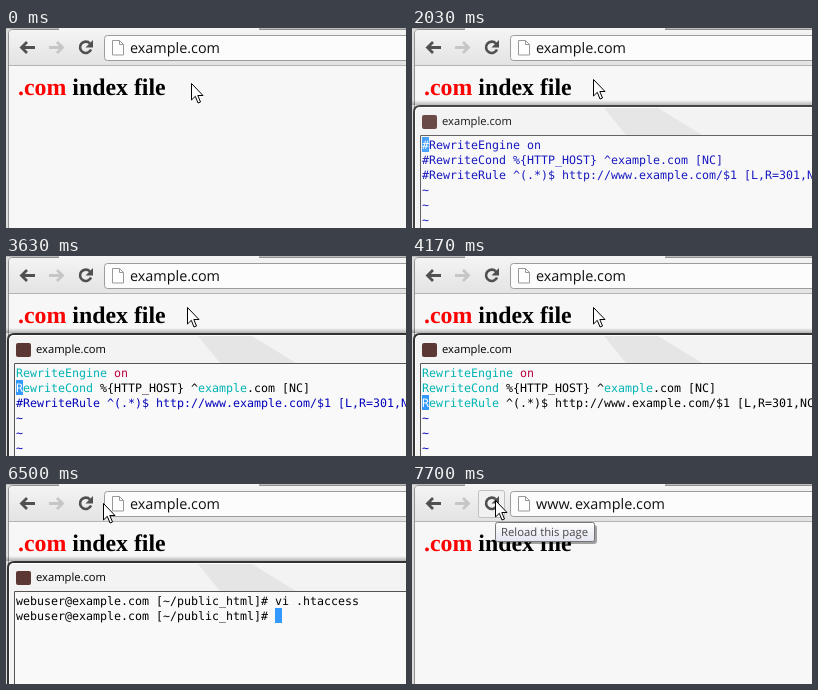
Write an HTML page that moves like this. It is 400 px wide and 200 px high and loops after 8030 ms.

```html
<!DOCTYPE html>
<html lang="en">
<head>
<meta charset="utf-8">
<title>Redirect demo</title>
<style>
html, body { margin: 0; width: 100%; height: 100%; overflow: hidden; }
svg { display: block; width: 400px; height: 200px; }
text { font-family: "Open Sans", "Noto Sans", sans-serif; white-space: pre; text-rendering: geometricPrecision; }
.heading { font: bold 23.85px "Liberation Serif", "Noto Serif", serif; }
.mono, .mono text { font: 11.63px "DejaVu Sans Mono", "Liberation Mono", monospace; }
</style>
</head>
<body>
<svg viewBox="0 0 400 200">
  <defs>
    <linearGradient id="bar" x2="0" y2="1"><stop stop-color="#f4f4f4"/><stop offset="1" stop-color="#e3e3e3"/></linearGradient>
    <linearGradient id="tip" x2="0" y2="1"><stop stop-color="#fff"/><stop offset="1" stop-color="#e4e5f0"/></linearGradient>
    <linearGradient id="shade" x2="0" y2="1"><stop stop-opacity="0"/><stop offset="1" stop-opacity=".28"/></linearGradient>
  </defs>

  <!-- Browser -->
  <rect width="400" height="200" fill="#dcdcdc"/>
  <rect width="400" height="1" fill="#bcbcbc"/>
  <path d="M2.500 201V6q0-4.500 4.500-4.500H401V201Z" fill="#f7f7f7" stroke="#929292"/>
  <path d="M3 37V6q0-4 4-4H400V37Z" fill="url(#bar)"/>
  <path d="M53 0H253V3H53Z" fill="#f4f4f4"/>
  <path d="M3 37.500H400" stroke="#b4b4b4"/>
  <g fill="none" stroke-width="2.800">
    <path d="M29 19.500H16M21 14l-5.500 5.500 5.500 5.500" stroke="#505050"/>
    <path d="M43 19.500H56M51 14l5.500 5.500-5.500 5.500" stroke="#c6c6c6"/>
  </g>
  <rect id="button" x="66.500" y="6.500" width="26" height="27" rx="2" stroke="#c0c0c0"/>
  <path d="M84 15.500A5.700 5.700 0 1 0 85 21.500" fill="none" stroke="#505050" stroke-width="2.600"/>
  <path d="M87 12v7.500h-7.500Z" fill="#505050"/>
  <rect x="98.500" y="7.500" width="320" height="25" rx="3" fill="#fcfcfc" stroke="#9c9c9c"/>
  <path d="M106.500 12.500h7l4 4v10.500h-11ZM113.500 12.500v4h4" fill="#fff" stroke="#999"/>
  <g font-size="14.400" fill="#111">
    <text id="www" x="124" y="25">www.</text>
    <text id="domain" y="25">example.com</text>
  </g>
  <text class="heading" x="12" y="67"><tspan fill="#f00">.com</tspan> index file</text>

  <!-- Terminal window -->
  <g id="terminal">
    <rect y="72" width="400" height="5" fill="url(#shade)"/>
    <path d="M2 202V84q0-6 6-6H402V202Z" fill="#f3f3f3" stroke="#333" stroke-width="2"/>
    <path d="M3.500 200V85q0-5.500 5.500-5.500H400" fill="none" stroke="#fff"/>
    <path d="M192 80H246L290 107H214Z" fill="#e5e5e5"/>
    <rect x="10" y="87" width="15" height="14" rx="2" fill="#5b3833"/>
    <text x="30" y="97" font-size="11.200">example.com</text>
    <path d="M8.500 201V107.500H401V201Z" fill="#f9f9f9" stroke="#555"/>
    <g class="mono">
      <g id="lines"></g>
      <rect id="block" width="7" height="15" fill="#39f"/>
      <text id="under" fill="#fff"></text>
    </g>
  </g>

  <g id="tooltip">
    <rect x="86" y="41" width="99" height="19" rx="3" opacity=".35"/>
    <rect x="83.500" y="38.500" width="99" height="19" rx="2" fill="url(#tip)" stroke="#777"/>
    <text x="89" y="52" font-size="11.300" fill="#484848">Reload this page</text>
  </g>
  <path id="pointer" d="M.5.500V17L4.300 13.300L7 20L9.500 19L6.800 12.500H12Z" fill="#fff" stroke="#000"/>
</svg>

<script>
const LOOP = 8030, FRAME = 200 / 3;
const $ = id => document.getElementById(id);

// Keys are [time, ...values], linear in between.
const pointerKeys = [
  [33, 185, 55], [167, 166, 49], [367, 100, 30], [500, 81, 24],
  [1300, 81, 24], [1433, 160, 48], [1500, 198, 60],
  [1767, 198, 60], [2033, 181, 51],
  [6033, 181, 51], [6233, 150, 39], [6500, 97, 19], [6633, 83, 16]
];
const fadeKeys = [[1767, 0], [2033, .9], [2100, .9], [2167, 1], [6967, 1], [7233, 0]];

function valueAt(keys, t) {
  const i = keys.findIndex(k => k[0] > t);
  if (i < 0) return keys[keys.length - 1].slice(1);
  if (i === 0) return keys[0].slice(1);
  const a = keys[i - 1], b = keys[i], p = (t - a[0]) / (b[0] - a[0]);
  return a.slice(1).map((v, j) => v + (b[j + 1] - v) * p);
}

const BLUE = "#00b", TEAL = "#00b4b4", RED = "#b04", BLACK = "#000";
const config = [
  { freed: 3030, parts: [["RewriteEngine", TEAL], [" on", RED]] },
  { freed: 3630, parts: [["RewriteCond", TEAL], [" %{HTTP_HOST} ^", BLACK], ["example", TEAL], [".com [NC]", BLACK]] },
  { freed: 4100, parts: [["RewriteRule", TEAL], [" ^(.*)$ http://www.example.com/$1 [L,R=301,NC]", BLACK]] }
];
const prompt = "webuser@example.com [~/public_html]# ";
const baseline = row => 121 + row * 15;
const plain = parts => parts.map(p => p[0]).join("");
const show = (id, on) => $(id).setAttribute("visibility", on ? "visible" : "hidden");

function editor(t) {
  const rows = config.map(({ freed, parts }) =>
    t >= freed ? parts : [["#" + plain(parts), BLUE]]);
  return rows.concat([0, 1, 2].map(() => [["~", BLUE]]));
}

let shown = "";
function drawTerminal(t) {
  const shell = t >= 5030;
  const rows = shell ? [[[prompt + "vi .htaccess", BLACK]], [[prompt, BLACK]]] : editor(t);
  const row = shell ? 1 : (t >= 3430) + (t >= 3900);
  const column = shell ? prompt.length : 0;
  const markup = rows.map((parts, i) => `<text x="10" y="${baseline(i)}">` +
    parts.map(([s, c]) => `<tspan fill="${c}">${s}</tspan>`).join("") + "</text>").join("");
  if (markup !== shown) $("lines").innerHTML = shown = markup;

  const x = 10 + column * 7;
  $("block").setAttribute("x", x);
  $("block").setAttribute("y", 109 + row * 15);
  $("under").setAttribute("x", x);
  $("under").setAttribute("y", baseline(row));
  $("under").textContent = plain(rows[row])[column] || "";
}

function draw(now) {
  const t = now % LOOP;
  // Motion advances at 15 frames a second.
  const snapped = 100 + Math.floor((t - 100) / FRAME + .06) * FRAME;
  const [x, y] = valueAt(pointerKeys, snapped);
  const pressed = (t >= 830 && t < 900) || (t >= 6830 && t < 6900);
  const redirected = t >= 7030;

  $("pointer").setAttribute("transform", `translate(${Math.round(x)} ${Math.round(y)})`);
  $("button").setAttribute("fill", pressed ? "#d2d2d2" : "#f1f1f1");
  show("button", x > 66 && x < 93 && y > 6 && y < 34);
  show("www", redirected);
  $("domain").setAttribute("x", redirected ? 163 : 124);
  $("terminal").setAttribute("opacity", valueAt(fadeKeys, snapped)[0]);
  show("tooltip", t >= 7700);
  drawTerminal(t);
  requestAnimationFrame(draw);
}
draw(performance.now());
</script>
</body>
</html>
```
